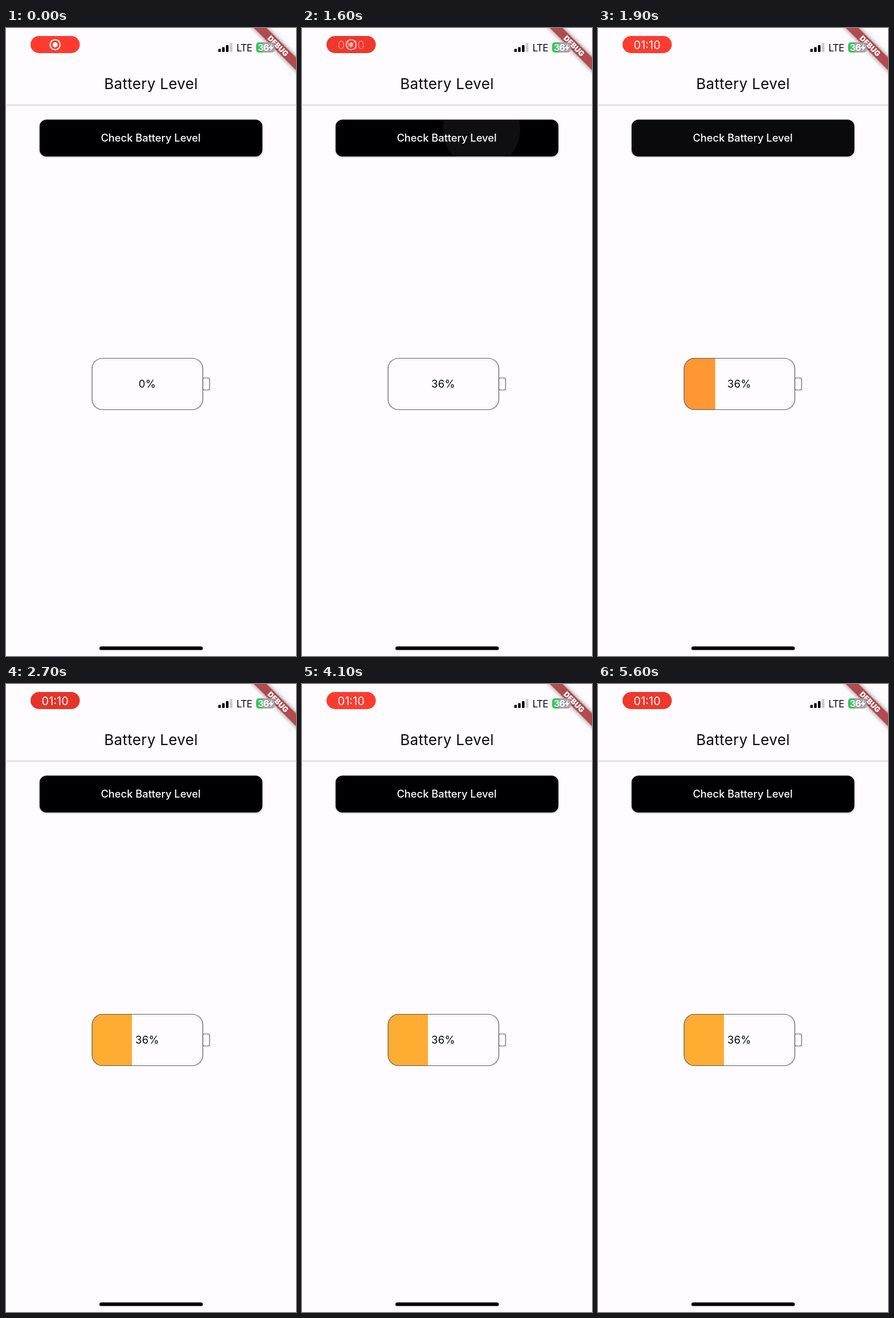
Write an HTML page that moves like this. It is 509 px wide and 1100 px high and loops after 5.7 s.

```html
<!DOCTYPE html>
<html lang="en">
<head>
<meta charset="utf-8">
<title>Battery Level</title>
<style>
  html, body { margin: 0; width: 100%; height: 100%; overflow: hidden; background: #fefcff; }
  svg { display: block; width: 509px; height: 1100px; }
  text { font-family: Inter, Roboto, sans-serif; text-anchor: middle; fill: #0a0a0c; }
  .white { fill: #fff; }
  .outline { fill: none; stroke: #5c5b5e; stroke-width: 1.2; }
  #button { filter: drop-shadow(0 1.5px 1.5px rgba(0, 0, 0, .35)); }
  #band { filter: drop-shadow(0 0 4px rgba(0, 0, 0, .5)); }
</style>
</head>
<body>
<svg viewBox="0 0 509 1100">
  <defs>
    <clipPath id="buttonClip"><rect x="59" y="160.5" width="391" height="64.5" rx="12"/></clipPath>
    <clipPath id="cellClip"><rect x="151" y="578.5" width="194.5" height="90" rx="18.5"/></clipPath>
    <clipPath id="chargeClip"><rect x="439" y="25" width="32.5" height="18" rx="5.5"/></clipPath>
  </defs>
  <rect width="509" height="1100" fill="#fefcff"/>

  <!-- App bar and button -->
  <text x="254.5" y="107" font-size="26" letter-spacing=".3">Battery Level</text>
  <rect y="134.4" width="509" height="1.3" fill="#c9c8cc"/>
  <rect id="button" x="59" y="160.5" width="391" height="64.5" rx="12" fill="#000002"/>
  <g clip-path="url(#buttonClip)"><circle id="ripple" fill="#fffaff"/></g>
  <text class="white" x="254" y="199.2" font-size="18.3" font-weight="500">Check Battery Level</text>

  <!-- Battery gauge -->
  <g clip-path="url(#cellClip)"><rect id="fill" x="151" y="578" height="91"/></g>
  <rect class="outline" x="151" y="578.5" width="194.5" height="90" rx="18.5"/>
  <rect class="outline" x="345.5" y="613" width="11.8" height="21" rx="2.2"/>
  <text id="level" x="248" y="630" font-size="18.5" letter-spacing=".3"></text>

  <!-- Corner ribbon -->
  <g transform="translate(509 0) rotate(45)">
    <rect id="band" x="-60" y="36.5" width="120" height="15.7" fill="#b14b4e"/>
    <text class="white" x="0" y="49.2" font-size="13" font-weight="900">DEBUG</text>
  </g>

  <!-- Status bar -->
  <rect x="43" y="14" width="86.5" height="30" rx="15" fill="#ff3b30"/>
  <rect id="dim" x="43" y="14" width="86.5" height="30" rx="15"/>
  <g id="record">
    <circle cx="86.2" cy="29.3" r="8.8" fill="none" stroke="#fff" stroke-width="2"/>
    <circle id="dot" class="white" cx="86.2" cy="29.3" r="4.4"/>
  </g>
  <text id="clock" class="white" x="86.2" y="36.6" font-size="20">01:10</text>
  <g fill="#050507">
    <rect x="372.5" y="36.5" width="4.6" height="5.5" rx="1.2"/>
    <rect x="379.2" y="33.5" width="4.6" height="8.5" rx="1.2"/>
    <rect x="386" y="30" width="4.6" height="12" rx="1.2"/>
    <rect x="392.8" y="26" width="4.6" height="16" rx="1.2" fill="#c9c8cb"/>
  </g>
  <text x="418.2" y="41" font-size="17.3" letter-spacing="-.8">LTE</text>
  <g clip-path="url(#chargeClip)">
    <rect x="439" y="25" width="32.5" height="18" fill="#a6a5a8"/>
    <rect x="439" y="25" width="12" height="18" fill="#34c759"/>
  </g>
  <text class="white" x="451.6" y="39.8" font-size="16" font-weight="700" letter-spacing="-.8">36</text>
  <path class="white" d="M467 27.5L460.8 35.2H465L463.6 41L470 33H465.8Z"/>

  <rect x="164" y="1083.2" width="181.5" height="6.4" rx="3.2" fill="#000"/>
</svg>
<script>
  const LOOP = 5700;
  const $ = id => document.getElementById(id);
  const set = (id, attrs) => {
    for (const name in attrs) $(id).setAttribute(name, attrs[name]);
  };
  const mix = (a, b, k) => a + (b - a) * k;
  const span = (t, from, to) => Math.min(1, Math.max(0, (t - from) / (to - from)));
  const easeOut = k => 1 - (1 - k) ** 1.65;
  const easeInOut = k => k * k * (3 - 2 * k);

  function drawPill(t) {
    const pulse = Math.cos((t - 50) / 2000 * 2 * Math.PI);
    const swap = span(t, 1480, 1800);
    set('dim', { opacity: 0.0725 * (1 - pulse) });
    set('record', { opacity: 1 - swap });
    set('dot', { r: mix(4.4, 2.6, swap) });
    set('clock', { opacity: swap });
  }

  function drawRipple(t) {
    const spread = easeInOut(span(t, 1600, 1820));
    const alpha = 0.06 * span(t, 1480, 1560) * (1 - span(t, 1800, 2080));
    set('ripple', {
      cx: mix(315, 254.5, spread),
      cy: mix(177, 193, spread),
      r: mix(60, 68, span(t, 1480, 1600)) + 142 * spread,
      opacity: alpha
    });
  }

  function drawGauge(t) {
    const k = easeOut(span(t, 1600, 2100));
    set('fill', {
      width: 194.5 * 0.36 * k,
      fill: `rgb(255, ${mix(75, 172, k)}, 51)`
    });
    $('level').textContent = t < 1550 ? '0%' : '36%';
  }

  function frame() {
    const t = performance.now() % LOOP;
    drawPill(t);
    drawRipple(t);
    drawGauge(t);
    requestAnimationFrame(frame);
  }
  frame();
</script>
</body>
</html>
```
